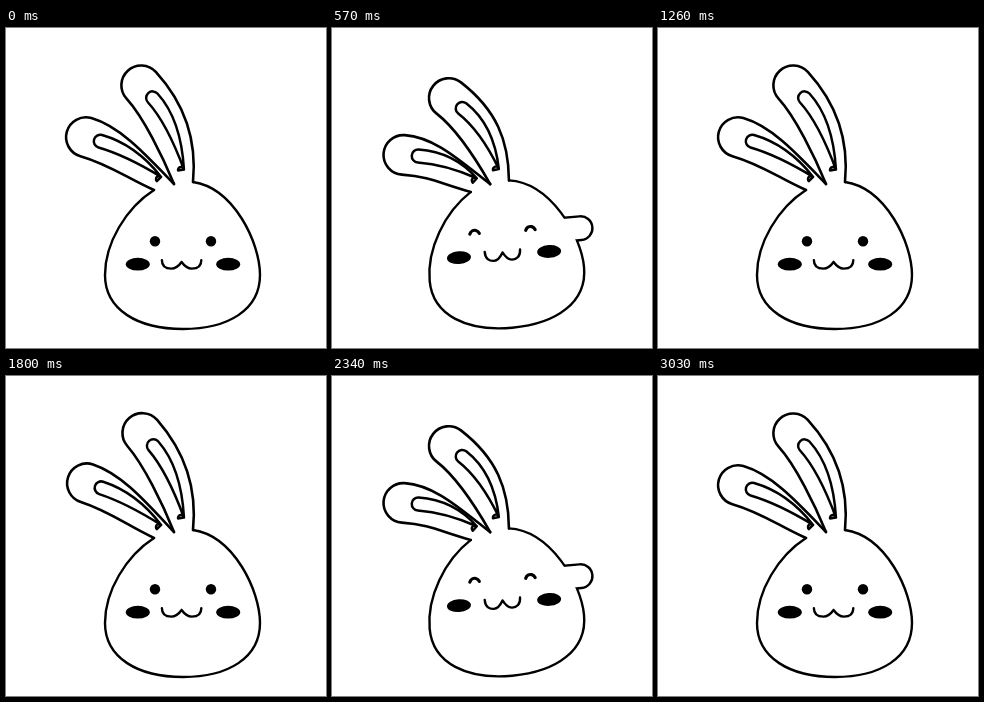
Write an HTML page with a canvas that moves like this. It is 320x320 px and loops after 3.6 s.

```html
<!DOCTYPE html>
<html>
<head>
<meta charset="utf-8">
<style>
html, body { margin: 0; width: 100%; height: 100%; overflow: hidden; background: #fff; }
canvas { display: block; width: 320px; height: 320px; }
</style>
</head>
<body>
<canvas id="c" width="320" height="320"></canvas>
<script>
const g = document.getElementById('c').getContext('2d');
const LOOP = 3600, CYCLE = 1770, STEP = 30, LAST = 42;
const MID = { x: 177, y: 232 };
const ROOT = [168, 156];

// swing, curl in degrees from upright; gain is how far the flop swings the ear
const LEFT_EAR = { from: [148, 162], to: ROOT, fold: [153, 151], swing: 62, gain: 24, curl: 12, len: 99.8, depth: 15, inner: 30, outer: 30 };
const RIGHT_EAR = { from: ROOT, to: [187, 154], fold: [175, 142], swing: 18.4, gain: 12, curl: 24, len: 104, depth: 17, inner: 25, outer: 45 };

const mix = (a, b, t) => a + (b - a) * t;
const clamp = (v, lo, hi) => Math.min(hi, Math.max(lo, v));
const along = (p, d, s) => [p[0] + d[0] * s, p[1] + d[1] * s];

function bump(k, center, width) {
  const d = clamp((k - center) / width, -1, 1);
  return Math.cos(d * Math.PI / 2) ** 2;
}

// two rocks to the side with a half return between them
function leanAt(k) {
  const x = Math.PI * clamp((k - 4) / 30, 0, 1);
  return 1.75 * Math.sin(x) + .75 * Math.sin(3 * x);
}

// negative is upright, positive is drooping
function flopAt(k, lean) {
  const e = .3 * lean - 1.15 * bump(k, 6, 6) - 1.15 * bump(k, 33, 6) + .25 * bump(k, 39.5, 2.5);
  return 1 - Math.exp(-.65 * e);
}

function heading(deg) {
  const a = deg * Math.PI / 180;
  return [-Math.sin(a), -Math.cos(a)];
}

function ink(width) {
  g.lineWidth = width;
  g.strokeStyle = '#000';
  g.stroke();
}

function cap(p, n, r) {
  const a = Math.atan2(n[1], n[0]);
  g.arc(p[0], p[1], r, a, a + Math.PI);
}

function ear(o, flop, lean) {
  const r = 19.8;
  const swing = o.swing + o.gain * flop;
  const curl = o.curl + 14 * flop;
  const len = o.len * (1 - .08 * clamp(lean, 0, 1)) - 4 * flop * flop;
  const c = along(ROOT, heading(swing), len);
  const u = heading(swing + curl), n = [u[1], -u[0]];
  const l = along(c, n, r), m = along(c, n, -r);

  g.beginPath();
  g.moveTo(...o.from);
  g.bezierCurveTo(...along(o.from, heading(swing + 4), 30), ...along(l, u, -o.inner), ...l);
  cap(c, n, r);
  g.bezierCurveTo(...along(m, u, -o.outer), ...along(o.to, heading(swing - 12 - curl / 2), 40), ...o.to);
  g.fillStyle = '#fff';
  g.fill();
  ink(2.6);

  // inner fold
  const q = along(c, u, -o.depth), w = 6.5, end = o.fold;
  const cl = along(along(q, n, w), u, -28), cr = along(along(q, n, -w), u, -35);
  const dx = end[0] - (cl[0] + cr[0]) / 2, dy = end[1] - (cl[1] + cr[1]) / 2;
  const d = Math.hypot(dx, dy), side = [dy / d, -dx / d];
  g.beginPath();
  cap(q, n, w);
  g.quadraticCurveTo(...cr, ...along(end, side, 3));
  cap(end, [-side[0], -side[1]], 3);
  g.quadraticCurveTo(...cl, ...along(q, n, w));
  g.closePath();
  ink(2.5);
}

function arm(reach, width, color) {
  g.beginPath();
  g.moveTo(224, 208);
  g.lineTo(226 + 28 * reach, 208);
  g.lineWidth = width;
  g.strokeStyle = color;
  g.stroke();
}

function body() {
  g.beginPath();
  g.moveTo(148, 162);
  g.bezierCurveTo(120, 180, 99, 215, 99, 247);
  g.bezierCurveTo(99, 282, 132, 301, 177, 301);
  g.bezierCurveTo(222, 301, 254, 282, 254, 247);
  g.bezierCurveTo(254, 215, 228, 160, 187, 154);
  g.fillStyle = '#fff';
  g.fill();
  ink(2.4);
}

function mouth(smile) {
  const w = mix(19.7, 17.7, smile), h = mix(6.6, 7.8, smile);
  g.beginPath();
  for (const s of [-1, 1]) {
    g.moveTo(s * w, -1.8);
    g.bezierCurveTo(s * w, h * .65, s * w * .78, h, s * w * .52, h);
    g.bezierCurveTo(s * w * .25, h, s * w * .12, h * .5, 0, 0);
  }
  ink(2.4);
}

function face(lean) {
  g.save();
  g.translate(MID.x - 1.5 * lean, 234 - 8.8 * lean);
  g.rotate(.022 * lean);
  g.fillStyle = '#000';
  for (const s of [-1, 1]) {
    g.beginPath();
    if (lean > .5) {
      g.arc(s * 28, -19, 5, 1.1 * Math.PI, 1.9 * Math.PI);
      ink(3.2);
    } else {
      g.arc(s * 28, -20.7, 5.2, 0, 7);
      g.fill();
    }
    g.beginPath();
    g.ellipse(s * 45.2, 2.2, 12, 6.4, 0, 0, 7);
    g.fill();
  }
  g.translate(-1.4, 0);
  mouth(clamp(lean, 0, 1));
  g.restore();
}

function draw(time) {
  const t = time % LOOP - STEP;
  const k = t < 0 || t >= 2 * CYCLE ? LAST : Math.min(LAST, Math.floor(t % CYCLE / STEP) + 1);
  const lean = leanAt(k), flop = flopAt(k, lean), reach = clamp(lean, 0, 1);

  g.fillStyle = '#fff';
  g.fillRect(0, 0, 320, 320);
  g.lineCap = g.lineJoin = 'round';
  g.save();
  g.translate(MID.x - 3 * lean, MID.y - lean);
  g.rotate(-.09 * lean);
  g.translate(-MID.x, -MID.y);
  arm(reach, 26.2, '#000');
  body();
  arm(reach, 21.4, '#fff');
  ear(RIGHT_EAR, flop, lean);
  ear(LEFT_EAR, flop, lean);
  face(lean);
  g.restore();
}

let start = null;
function frame(now) {
  if (start === null) start = now;
  draw(now - start);
  requestAnimationFrame(frame);
}
draw(0);
requestAnimationFrame(frame);
</script>
</body>
</html>
```
